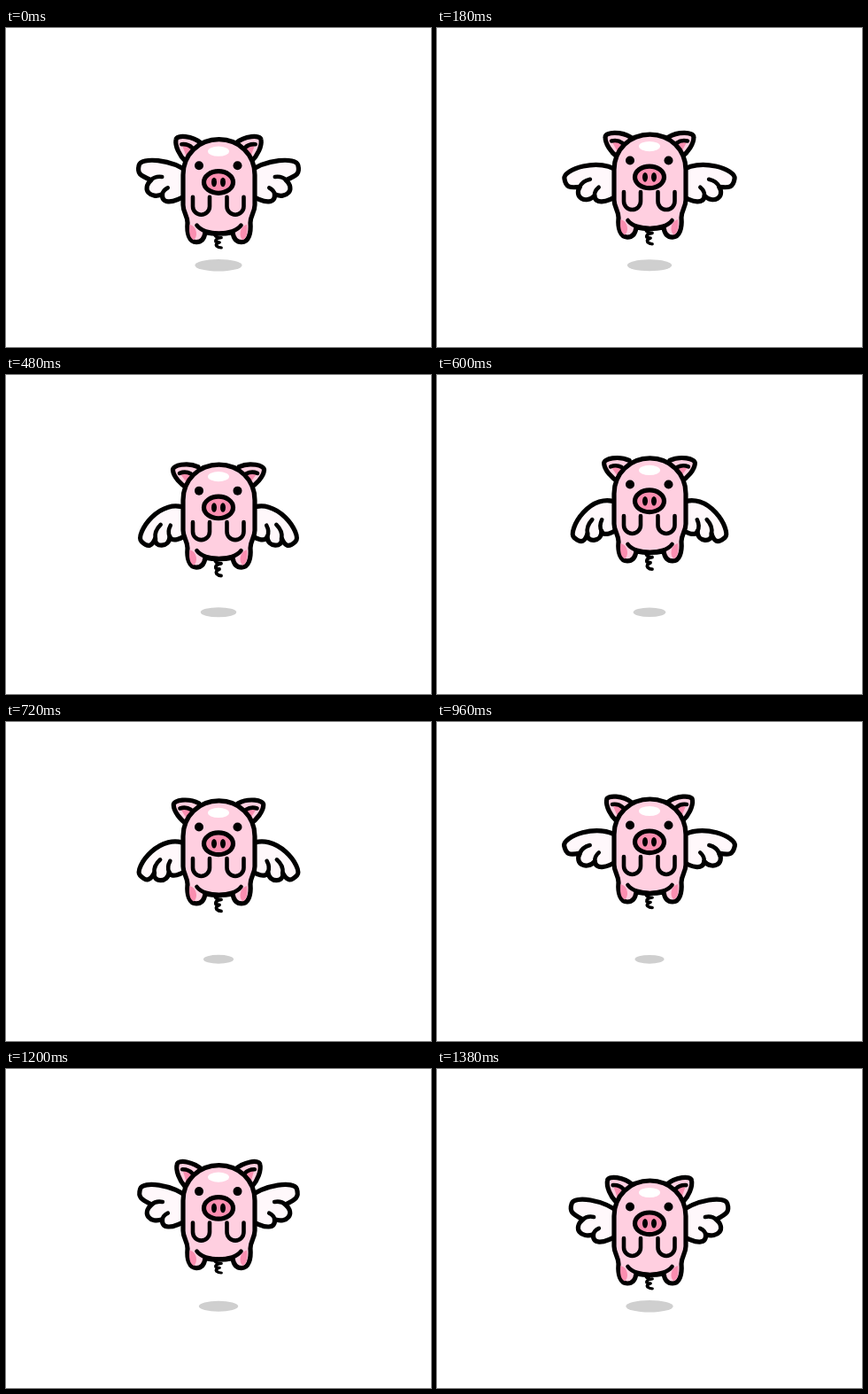
Recreate the animation shown at these times as an HTML page. Size 480x360 px, loop 1440 ms.

```html
<!DOCTYPE html>
<html lang="en">
<head>
<meta charset="utf-8">
<title>Flying pig</title>
<style>
  html, body { margin: 0; width: 100%; height: 100%; overflow: hidden; background: #fff; }
  svg { display: block; width: 100vw; height: 100vh; }
  .ink { stroke: #000; stroke-width: 5.2; stroke-linecap: round; stroke-linejoin: round; }
  .line { fill: none; stroke-width: 4.6; }
  #tail { stroke-width: 3.8; }
  .skin { fill: #ffcfe0; }
  .rose { fill: #fa8eb0; }
</style>
</head>
<body>
<svg viewBox="0 0 480 360">
  <ellipse id="shadow" cx="240" cy="267.8" fill="#cfcfcf"/>
  <g id="pig">
    <g id="wing">
      <path id="feathers" class="ink" fill="#fff8fb"/>
      <path id="folds" class="ink line"/>
    </g>
    <use href="#wing" transform="matrix(-1 0 0 1 480 0)"/>
    <path id="tail" class="ink line" d="M236 234q2 4 7 3.5q-7 1 -6 5q2 1 4 1q-5 2 -3 5q2 2 5 2"/>
    <g id="ear">
      <path class="ink skin" d="M203 151C196 145 190.5 134 191.5 127C192 121 210 122 220 130"/>
      <path class="rose" d="M199 134Q206 132 211 136L204 146Z"/>
      <path class="ink line" d="M198 132Q205 131 210 135.5"/>
    </g>
    <use href="#ear" transform="matrix(-1 0 0 1 480 0)"/>
    <path class="ink skin" d="M200 166C200 143 218 126 240.5 126S281 143 281 166V200
      C281 208 276 212 276 220C277 232 274 242 266 242C260 242 257 238 256 231
      Q240.5 234 225 231C224 238 221 242 215 242C207 242 204 232 205 220C205 212 200 208 200 200Z"/>
    <g id="half">
      <path class="rose" d="M207.5 222C216 224 217 236 212 239.5C207 237 206.5 230 207.5 222Z"/>
      <path class="ink line" d="M211 191V201.5a9.5 9.5 0 0 0 19 0V191"/>
      <circle cx="218" cy="155.5" r="5"/>
    </g>
    <use href="#half" transform="matrix(-1 0 0 1 479.5 0)"/>
    <path class="ink line" d="M215.5 223C224 235 257 235 265.5 223"/>
    <ellipse cx="240" cy="139.5" rx="12" ry="5.6" fill="#fff"/>
    <ellipse class="ink rose" cx="240" cy="174.3" rx="16.5" ry="12.3"/>
    <ellipse cx="235" cy="174.3" rx="3" ry="5.3"/>
    <ellipse cx="245" cy="174.3" rx="3" ry="5.3"/>
  </g>
</svg>
<script>
const LOOP = 1440, STEP = 60;
const el = id => document.getElementById(id);
const ease = x => (1 - Math.cos(Math.PI * Math.min(1, Math.max(0, x)))) / 2;
const wave = (t, peak) => Math.cos((t - peak) / LOOP * 2 * Math.PI);

// Point around the wing joint: 0 degrees points outwards, positive angles down
function polar(degrees, radius) {
  const a = degrees * Math.PI / 180;
  return `${200 - radius * Math.cos(a)} ${175 + radius * Math.sin(a)} `;
}

// The flap angle of the leading feather sets the whole wing; later feathers hang lower and shorter
function drawWing(flap) {
  const angle = i => flap * (1 - .27 * i) + 28 * i;
  const length = i => 56 - 12.5 * i + .11 * flap;
  const tip = (i, turn, scale) => polar(angle(i) + turn, length(i) * scale);
  const reach = .8 + .0015 * flap;

  let outline = `M206 ${168 + .22 * flap}C${polar(.55 * flap - 52, 30)}${tip(0, -10, 1.04)}${tip(0, 0, 1)}S${tip(0, 12, .92)}`;
  let folds = '';
  for (const i of [0, 1]) {
    const notch = angle(i + .5), radius = length(i + .5) * reach;
    outline += `${polar(notch, radius)}C${tip(i + 1, -3, 1.17)}${tip(i + 1, 15, 1)}`;
    folds += `M${polar(notch, radius)}Q${polar(notch - 9, radius * .9)}${polar(notch - 11, radius * .68)}`;
  }
  el('feathers').setAttribute('d', `${outline}206 ${193 + .25 * flap}`);
  el('folds').setAttribute('d', folds);
}

function draw(now) {
  const t = Math.floor(now % LOOP / STEP) * STEP;
  const rise = 39 * (ease((t + 50) / 900) - ease((t - 1045) / 290));
  const sway = wave(t, 500);
  el('pig').setAttribute('transform', `translate(0 ${-rise})`);
  el('ear').setAttribute('transform', `rotate(${-4 - 10 * sway} 212 142)`);
  el('tail').setAttribute('transform', `translate(0 234) scale(1 ${.93 + .12 * sway}) translate(0 -234)`);
  el('shadow').setAttribute('rx', 26.7 - rise * .26);
  el('shadow').setAttribute('ry', 6.8 - rise * .05);
  drawWing(7 + 35 * wave(t, 580));
  requestAnimationFrame(draw);
}
draw(0);
</script>
</body>
</html>
```
